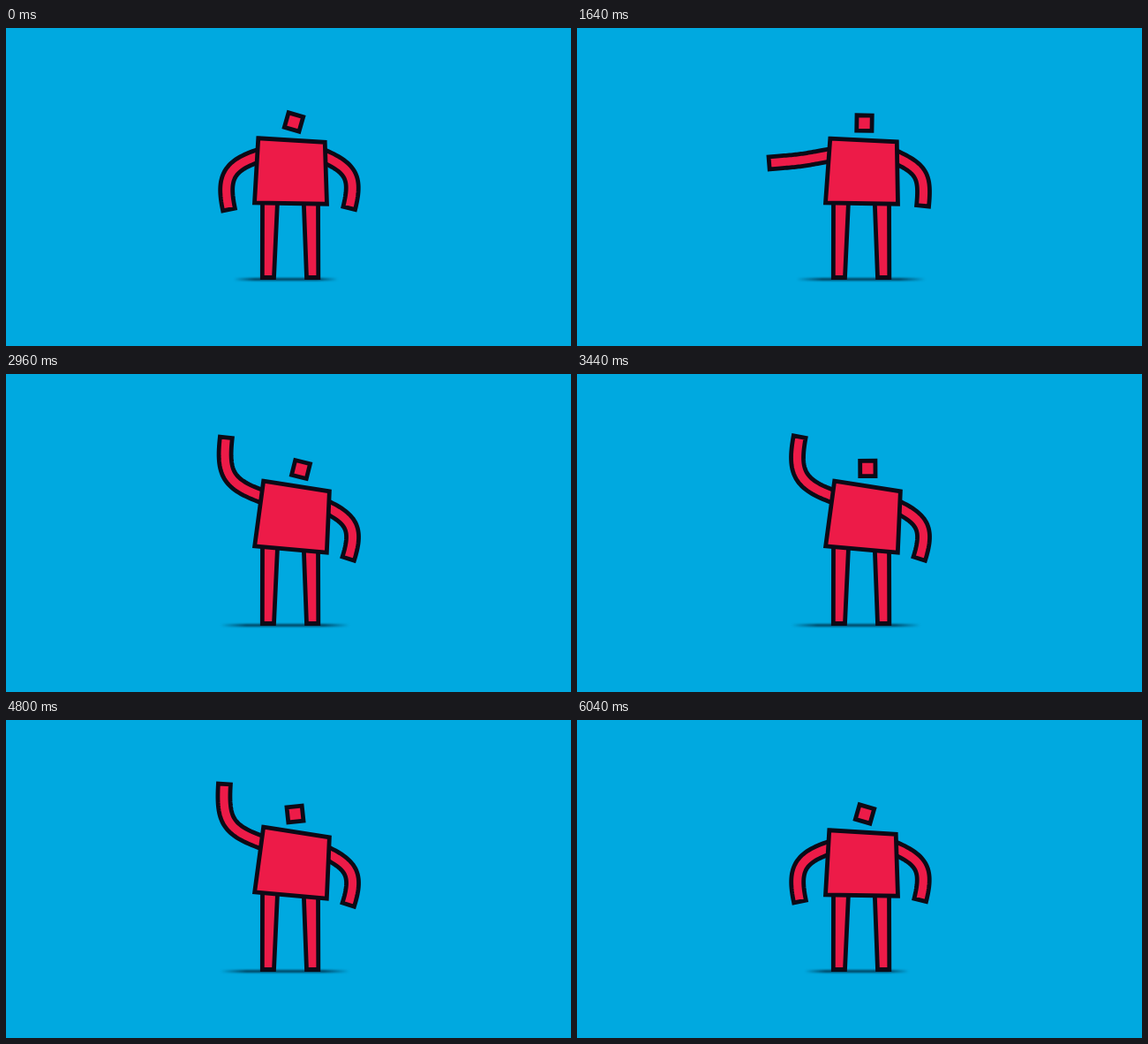
Animation, 640 px wide and 360 px high, one loop 7000 ms. Source, as an HTML page with a canvas:

```html
<!DOCTYPE html>
<html lang="en">
<head>
<meta charset="utf-8">
<title>Waving figure</title>
<style>
  html, body { margin: 0; width: 100%; height: 100%; overflow: hidden; background: #00a9e0; }
  canvas { display: block; width: 100vw; height: 100vh; }
</style>
</head>
<body>
<canvas id="stage" width="640" height="360"></canvas>
<script>
const ctx = document.getElementById('stage').getContext('2d');
const BLUE = '#00a9e0', RED = '#ed1b48', INK = '#0c0a16';
const LOOP = 7000, STEP = 40;
const ARM_HALF = 7, HANDLE = 0.53;

// head: x, y, tilt; torso: x of chest, tilt of chest, tilt of hips
// ground: shadow from, to; arms: shoulder x, y, angle, reach, curl
const REST = {
  head: [326, 106.5, 16], torso: [323.5, 3.4, 1], ground: [258, 376],
  right: [360, 145, 64, 65.5, 40], left: [288, 144, 120, 71, -42]
};
const LEAN = {
  head: [314.5, 107, -16], torso: [318.8, -5, -4.5], ground: [256, 402],
  right: [356, 139, 52, 65, 28], left: [287, 148, 115, 70, -41]
};
const GREET = {
  head: [334, 108, 14], torso: [329, 8.8, 5.2], ground: [243, 389],
  right: [362, 150, 66.5, 64.5, 41], left: [290, 139, 230, 73, 47]
};
const LOOK = [327.5, 106.5, -6];
const WAVE_IN = [291, 139, 241, 78, 41], WAVE_OUT = [291, 139, 224, 84, 24];

const span = (t, from, to) => Math.min(1, Math.max(0, (t - from) / (to - from)));
const sine = p => (1 - Math.cos(Math.PI * p)) / 2;
const cubic = p => p < 0.5 ? 4 * p ** 3 : 1 - 4 * (1 - p) ** 3;
const mix = (a, b, p) => a.map((v, i) => v + (b[i] - v) * p);
const polar = (x, y, r, degrees) => {
  const a = degrees * Math.PI / 180;
  return [x + r * Math.cos(a), y + r * Math.sin(a)];
};

function wave(t) {
  const period = t < 3920 ? 450 : 480;
  const p = (1 + Math.cos(2 * Math.PI * (t - 3920) / period)) / 2;
  return mix(WAVE_OUT, WAVE_IN, p);
}

// Rest, lean, greet and back to rest; "held" is the state reached while greeting
function part(t, name, held = GREET[name], arrive = 1980, settle = 5600) {
  if (t < 1240) return mix(REST[name], LEAN[name], sine(span(t, 400, 800)));
  if (t < 4880) return mix(LEAN[name], held, sine(span(t, 1240, arrive)));
  return mix(held, REST[name], cubic(span(t, 4880, settle)));
}

function leftArm(t) {
  if (t >= 2120 && t < 4880) return wave(t);
  if (t >= 4880) return part(t, 'left', WAVE_IN, 2040, 6040);
  return mix(part(t, 'left', GREET.left, 2040), WAVE_IN, sine(span(t, 2040, 2120)));
}

function shape(points) {
  ctx.beginPath();
  for (const [x, y] of points) ctx.lineTo(x, y);
  ctx.closePath();
  ctx.fill();
  ctx.stroke();
}

// Both ends of the arm bend away from the line between shoulder and hand
function drawArm([x, y, angle, reach, curl]) {
  const hand = polar(x, y, reach, angle);
  const curve = [
    [x, y],
    polar(x, y, reach * HANDLE, angle - curl),
    polar(...hand, -reach * HANDLE, angle + curl),
    hand
  ];
  const near = [], far = [], n = 32;
  for (let i = 0; i <= n; i++) {
    const u = i / n;
    const [a, b, c] = [0, 1, 2].map(k => mix(curve[k], curve[k + 1], u));
    const from = mix(a, b, u), to = mix(b, c, u);
    const [px, py] = mix(from, to, u);
    const dx = to[0] - from[0], dy = to[1] - from[1];
    const k = ARM_HALF / Math.hypot(dx, dy);
    near.push([px - dy * k, py + dx * k]);
    far.unshift([px + dy * k, py - dx * k]);
  }
  shape([...near, ...far]);
}

function drawTorso([x, chest, hips]) {
  const edge = (cx, cy, half, tilt) => [polar(cx, cy, -half, tilt), polar(cx, cy, half, tilt)];
  shape([...edge(x, 127, 37.8, chest), ...edge(322.5, 198.5, 41, hips).reverse()]);
}

function drawHead([x, y, tilt]) {
  shape([45, 135, 225, 315].map(corner => polar(x, y, 12.2, corner + tilt)));
}

function drawLegs() {
  shape([[290.5, 190], [307.8, 190], [303.5, 282.5], [290.3, 282.5]]);
  shape([[337, 190], [353.5, 190], [353.8, 282.5], [340.5, 282.5]]);
}

function drawShadow([from, to]) {
  const fade = ctx.createLinearGradient(from, 0, to, 0);
  for (const [stop, alpha] of [[0, 0], [0.2, 0.75], [0.8, 0.75], [1, 0]]) {
    fade.addColorStop(stop, `rgba(0,30,50,${alpha})`);
  }
  ctx.save();
  ctx.filter = 'blur(1.2px)';
  ctx.fillStyle = fade;
  ctx.fillRect(from, 283, to - from, 3);
  ctx.restore();
}

function draw(t) {
  ctx.fillStyle = BLUE;
  ctx.fillRect(0, 0, 640, 360);
  drawShadow(part(t, 'ground', GREET.ground, 1980, 6040));

  ctx.fillStyle = RED;
  ctx.strokeStyle = INK;
  ctx.lineWidth = 4.8;
  drawLegs();
  drawArm(leftArm(t));
  drawArm(part(t, 'right', GREET.right, 1980, 5720));
  drawTorso(part(t, 'torso'));
  drawHead(part(t, 'head', mix(GREET.head, LOOK, sine(span(t, 3080, 3640)))));
}

const begin = performance.now();
function tick() {
  const t = (performance.now() - begin) % LOOP;
  draw(Math.floor(t / STEP) * STEP);
  requestAnimationFrame(tick);
}
tick();
</script>
</body>
</html>
```
